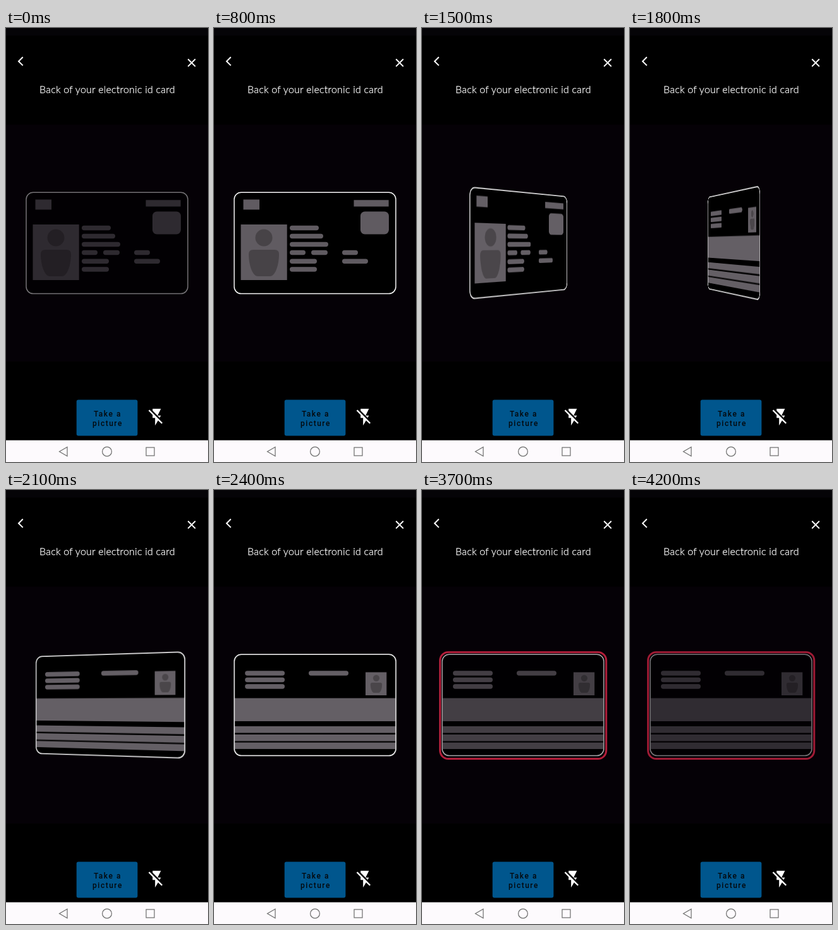
These frames come from a looping animation (320x687 px, 4300 ms). An HTML page:

```html
<!DOCTYPE html>
<html lang="en">
<head>
<meta charset="utf-8">
<title>Scan the card</title>
<style>
  html, body { margin: 0; width: 100%; height: 100%; overflow: hidden; background: #000; }
  #stage { position: relative; width: 320px; height: 687px; overflow: hidden; }
  #stage svg, #scene, #card { position: absolute; left: 0; top: 0; width: 320px; height: 687px; }
  #scene { perspective: 1100px; perspective-origin: 160px 340.5px; }
  #card { transform-style: preserve-3d; transform-origin: 160px 340.5px; }
  #card svg { backface-visibility: hidden; transform-origin: 160px 340.5px; }
  #back { transform: rotateY(180deg); }
  .edge { fill: #000; stroke: none; }
  .line { fill: none; stroke: #fff; stroke-width: 1.5; }
  .block { fill: #645f65; }
  .person { fill: #4a464a; }
  .title { font: 300 16px Lato, "Open Sans", sans-serif; letter-spacing: .22px; fill: #fff; stroke: #fff; stroke-width: .3; }
  .label { font: 500 12px Roboto, Inter, sans-serif; letter-spacing: 1.5px; fill: #04080c; }
  text { text-anchor: middle; }
</style>
</head>
<body>
<div id="stage">
  <svg viewBox="0 0 320 687">
    <rect width="320" height="687" fill="#000"/>
    <rect width="320" height="12" fill="#050407"/>
    <rect y="153" width="320" height="375" fill="#050106"/>
    <g fill="none" stroke="#fff" stroke-width="2">
      <path d="M26.7 46L20 52.7L26.7 59.4"/>
      <path d="M288.3 49.3L299.9 60.9M299.9 49.3L288.3 60.9"/>
    </g>
    <text class="title" x="160.4" y="102.5">Back of your electronic id card</text>
    <rect x="111.7" y="588.6" width="96.7" height="57" rx="3" fill="#00568d"/>
    <text class="label" x="161" y="615">Take a</text>
    <text class="label" x="161" y="629.5">picture</text>
    <path fill="#fff" transform="translate(223 600.2) scale(1.32)"
      d="M3.27 3L2 4.27l5 5V13h3v9l3.58-6.14L17.73 20 19 18.73zM17 10h-4l4-8H7v2.18l8.46 8.46z"/>
    <rect y="652.6" width="320" height="34.4" fill="#fdfafd"/>
    <g fill="none" stroke="#6c6c6c" stroke-width="1.2">
      <path d="M84.5 670.5L97 663.2V677.8Z"/>
      <circle cx="160" cy="670.5" r="7.4"/>
      <rect x="222" y="664" width="13" height="13"/>
    </g>
  </svg>

  <div id="scene">
    <div id="card">
      <svg id="front" viewBox="0 0 320 687"></svg>
      <svg id="back" viewBox="0 0 320 687"></svg>
    </div>
  </div>

  <svg viewBox="0 0 320 687">
    <rect id="ring" x="28.6" y="256.7" width="263.2" height="168.8" rx="13"
      fill="none" stroke="#c42140" stroke-width="3"/>
  </svg>
</div>

<script>
const LOOP = 4300, STEP = 100;
const $ = id => document.getElementById(id);

const rect = (x, y, x2, y2, r = 0, cls = 'block') =>
  `<rect class="${cls}" x="${x}" y="${y}" width="${x2 - x}" height="${y2 - y}" rx="${r}"/>`;
const pill = ([x, x2, y]) => rect(x, y - 3.7, x2, y + 3.7, 3.7);
const outline = cls => rect(32, 260.3, 288, 420.6, 11, cls);

// Head and shoulders, drawn around the centre of the portrait
const person = (x, y, k) => `<g class="person" transform="translate(${x} ${y}) scale(${k})">
  <circle cy="-23" r="13.5"/>
  <path d="M-17-4H17Q24-4 24 3C24 22 17 38 10 38H-10C-17 38-24 22-24 3Q-24-4-17-4Z"/></g>`;

const frontLines = [
  [120, 166, 316.5], [120, 173, 329.5], [120, 181, 342.5],
  [120, 145, 355.5], [154, 180, 355.5], [203, 228, 355.5],
  [120, 163, 369.2], [203, 244, 369.2], [120, 163, 382]
];
const backLines = [[49, 112, 290], [49, 112, 300.5], [49, 112, 311], [150, 213, 290]];
const bands = [[329.5, 366], [374, 384.5], [387, 397.5], [399.7, 410]];

$('front').innerHTML = outline('edge')
  + rect(46.5, 271.5, 72, 287.5) + rect(221.5, 272.3, 276.7, 282.6)
  + rect(232, 290.5, 277, 326.5, 7) + rect(42.5, 311, 115.7, 399)
  + person(79, 355, 1) + frontLines.map(pill).join('') + outline('line');

$('back').innerHTML = outline('edge')
  + backLines.map(pill).join('') + rect(240, 288.5, 273.3, 325)
  + person(257, 306.5, .38)
  + bands.map(([y, y2]) => rect(32.5, y, 287.5, y2)).join('') + outline('line');

// Keys are [time, value]; values are linear in between
const fade = [[0, .45], [850, 1], [2820, 1], [4300, .43]];
const alert = [[2850, 0], [3250, 1], [4300, .8]];

function track(keys, t) {
  if (t <= keys[0][0]) return keys[0][1];
  const i = keys.findIndex(k => k[0] >= t);
  const [t0, v0] = keys[i - 1], [t1, v1] = keys[i];
  return v0 + (v1 - v0) * (t - t0) / (t1 - t0);
}

function turn(t) {
  const p = Math.min(1, Math.max(0, (t - 948) / 1505));
  return 90 * (1 - Math.cos(Math.PI * p));
}

function draw(t) {
  $('scene').style.opacity = track(fade, t);
  $('card').style.transform = `rotateY(${turn(t)}deg)`;
  $('ring').style.opacity = track(alert, t);
}

const start = performance.now();
function tick() {
  const t = (performance.now() - start + 5) % LOOP;
  draw(Math.floor(t / STEP) * STEP);
  requestAnimationFrame(tick);
}
tick();
</script>
</body>
</html>
```
